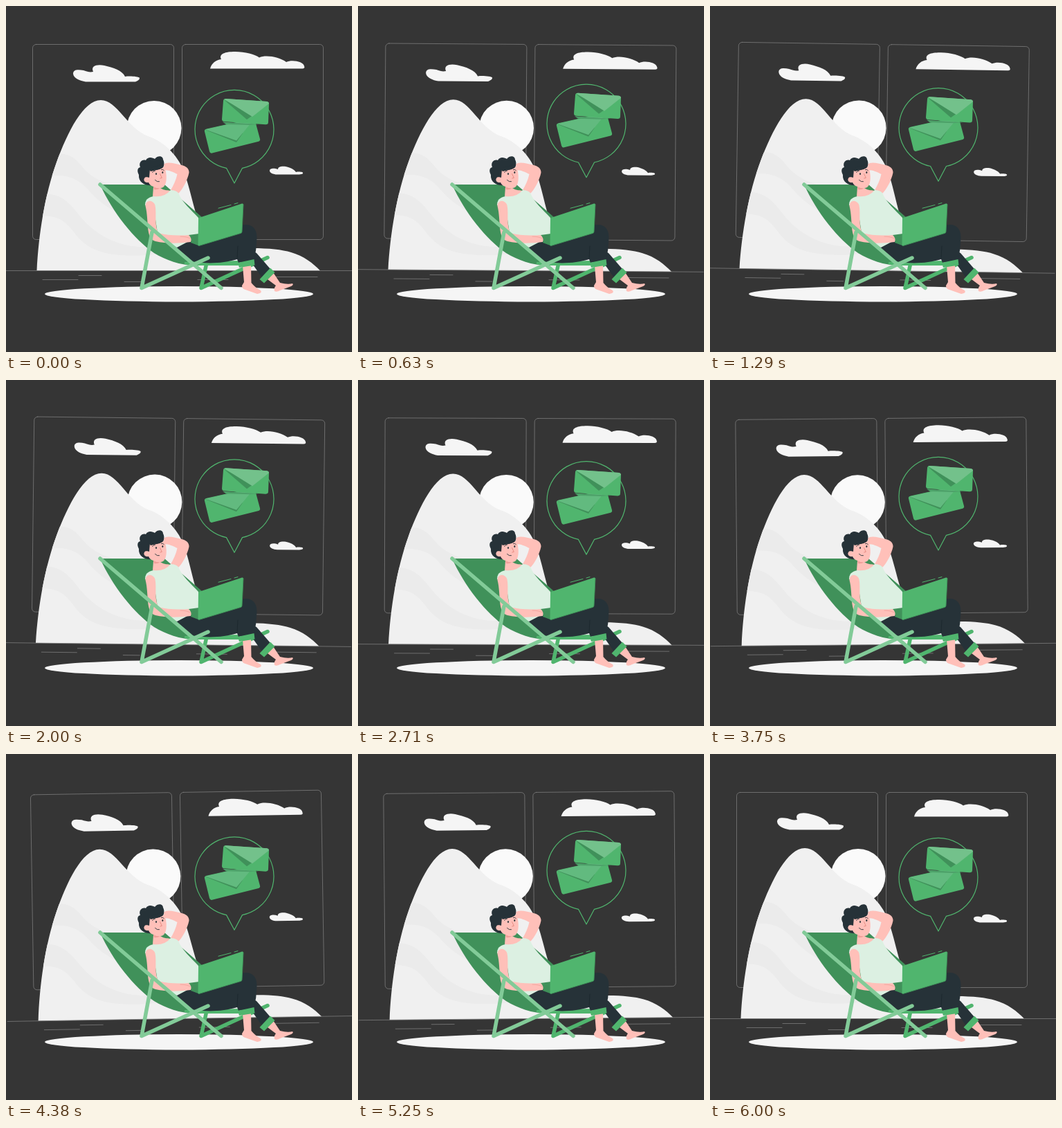
Recreate the animation shown at these times as an HTML page with a canvas. Size 500 by 500 pixels, loop 6.04 s.

```html
<!DOCTYPE html>
<html lang="en">
<head>
<meta charset="utf-8">
<title>Reading mail outdoors</title>
<style>
html, body { margin: 0; width: 100%; height: 100%; overflow: hidden; background: #353535; }
canvas { display: block; width: 500px; height: 500px; }
</style>
</head>
<body>
<canvas id="stage" width="500" height="500"></canvas>
<script>
const ctx = document.getElementById('stage').getContext('2d');
const LOOP = 6040, FPS = 24;
const C = {
  bg: '#353535', snow: '#f0f0f0', band: '#ebebeb', sun: '#fafafa', cloud: '#f5f5f5',
  line: '#7c7c7c', green: '#50b56e', deep: '#40915a', pale: '#82cb98',
  skin: '#ffc0b9', shade: '#f0a09a', shirt: '#dcf0e2', dark: '#263238'
};

function fill(d, color) {
  ctx.fillStyle = color;
  ctx.fill(new Path2D(d));
}

function stroke(d, color, width) {
  ctx.strokeStyle = color;
  ctx.lineWidth = width;
  ctx.stroke(new Path2D(d));
}

function ellipse(x, y, rx, ry, color) {
  ctx.fillStyle = color;
  ctx.beginPath();
  ctx.ellipse(x, y, rx, ry, 0, 0, Math.PI * 2);
  ctx.fill();
}

function pane(x) {
  ctx.strokeStyle = C.line;
  ctx.lineWidth = 0.8;
  ctx.beginPath();
  ctx.roundRect(x, 55.5, 204, 282, 5);
  ctx.stroke();
}

function landscape() {
  pane(38.5);
  pane(254.5);
  ellipse(214, 176.5, 39.5, 39.5, C.sun);

  const hill = 'M44.5 382.5C47 331 56 273 73 226C89 182 112 136 137 136C161 136 174 176 205 188' +
    'C224 194 244 211 254 232C266 258 271 298 284 326C300 348 330 350 356 350' +
    'C380 350 399 352 412 356C430 361 444 372 454 382.5Z';
  fill(hill, C.snow);
  ctx.save();
  ctx.clip(new Path2D(hill));
  fill('M70 215C87 211 98 217 110 232C126 252 146 256 168 264L280 300V330L200 312' +
    'C164 304 137 287 120 267C105 249 88 242 60 246Z', C.band);
  fill('M50 272C76 269 90 282 104 300C123 325 150 342 182 347C206 350 228 348 250 342V352' +
    'C222 360 188 363 156 359C126 355 111 344 99 328C83 307 72 302 44 304Z', C.band);
  ctx.restore();

  fill('M97 98C97 91 105 92 112 93C118 95 121 96 126 95C122 86 132 84 142 86C155 89 168 93 172 102' +
    'C179 101 192 102 193 104C193 107 190 108 187 109.5H115C107 108 98 105 97 98Z', C.cloud);
  fill('M295 90.5C297 83 303 78 311 77C307 69 317 66 331 66C345 66 360 70 366 74.5' +
    'C376 70 395 74 405 81C413 77 430 80 431 87C432 89 431 90.5 428 90.5Z', C.cloud);
  fill('M381 238C381 234 388 234 393 236C393 231 402 231 408 233C414 235 417 237 419 240' +
    'C424 239 430 240 429 241.5C429 243 426 243 424 243.5H392C386 243.5 381 241 381 238Z', C.cloud);

  stroke('M0 382.5H500M53 395.5H104M105 389.5H138M171 398.5H195M277 395.5H321M385 391.5H450', C.line, 0.8);
}

function mail() {
  stroke('M319 234.4A57 57 0 1 1 341 234.4L330 256Z', C.bg, 0.01);
  stroke('M341.5 234.3L330 256L318.5 234.3A57 57 0 1 1 341.5 234.3', C.green, 1.2);

  // lower envelope
  fill('M290 177.5L355 163Q359 162 360 166L367 192Q368 195 364 196L298 212.5Q295 213.5 294 210L287 181.5Q286 178.5 290 177.5Z', C.green);
  fill('M288 179L333 197L342 184Z', C.deep);
  fill('M288 178.5L333 194.5L355 168L357 163Z', '#62ba7f');
  fill('M313 167.5L365 171L352 172L318 171Z', '#4da169');

  // upper envelope
  fill('M318 134L377 138Q380 138.5 380 141.5L379 168Q379 171.5 375 171.3L315 167Q312 166.5 312 163.5L314 137Q314.3 133.7 318 134Z', C.green);
  fill('M315 135.5L348 164L358 157Z', C.deep);
  fill('M315.5 134.7Q316 134 318 134L377 138Q380 138.5 380 141L356 160Z', '#73c18b');
}

function chairBack() {
  stroke('M378 363.5L282 407.5L290 371', C.green, 5.5);
  fill('M136 258H229L283 305L290 372L337 370V375H275C251 375 231 367 214 357C185 337 154 298 136 258Z', C.deep);
  fill('M258 370L337 368V375H275Q266 375 258 373Z', C.green);
}

function head() {
  fill('M228 229C233 224 243 228 252 229.5C260 231 265 235 264.5 241C262 252 256 264 249 271L237 268' +
    'C242 259 246 251 247.5 243C242 240 235 237 229 237Z', C.skin);
  fill('M192 244C189 238 190 234 194 233C191 226 197 221 202 223C205 217 212 219 215 221' +
    'C220 215 227 217 227 222C230 227 228 235 223 237L211 259C201 260 191 255 192 244Z', C.dark);
  fill('M208 236C214 238 222 237 229 232C232 240 233 252 230 258C229 261 226 263 223 263' +
    'C229 267 234 266 238 267C238 275 221 281 212 275L213 261C209 260 207 257 206 255' +
    'C201 256 198 252 200 249C202 246 205 248 207 248Z', C.skin);
  fill('M213 261Q218 264 223 263Q219 266 214 265Z', C.shade);
  fill('M206 235L228 228Q229 233 222 236L209 239Z', C.dark);
  ellipse(217, 242.5, 1, 1.5, C.dark);
  ellipse(226.3, 240.5, 1, 1.5, C.dark);
  stroke('M211.5 240.5Q213 238 215.5 238M224.5 236.5Q227 235.8 228.3 237.5M215.5 251.5Q218.5 254.8 221.5 253.8', C.dark, 0.9);
  stroke('M222.5 242.5L225.3 248.3L222.7 249', '#e08078', 0.8);
}

function body() {
  // far leg
  fill('M374 392L386 385L396 400Q407 403 414 401Q416 403 412 405L396 411Q391 414 388 412Q387 407 390 404Z', C.skin);
  fill('M352 352L362 357L382 380L371 394L357 374Z', C.dark);
  fill('M382 378.5L388.5 385L373 400.5L366.5 395Z', C.green);

  // near leg
  fill('M342 375L354 373L354.5 400Q360 407 368 411Q371 415 363 416L346 410Q341 409 341 404L344 399Z', C.skin);
  fill('M245 349L268 338L340 317C353 313 363 320 362.5 335Q362 352 358.5 368L336 371L334 366' +
    'C312 373 279 373 263 367Z', C.dark);
  stroke('M334 365L335 347', '#19242a', 0.7);
  fill('M335 371L358.5 366L359.5 374.5L337 378Z', C.green);

  // shirt and arm
  fill('M203 280Q207 276 213 275Q229 277 238 266Q245 266 249 270C254 283 267 294 278 306L279 329' +
    'L264 340L247 349L229 340L219 328L213 289L201 288Q201 283 203 280Z', C.shirt);
  fill('M201.5 289C202 279 213 280 215.5 288C218 301 214 315 220 328Q239 333 264 331Q271 335 267 341' +
    'Q238 345 216 340C201 336 207 310 201.5 289Z', C.skin);
  stroke('M252 333Q261 333 266 336', C.shade, 0.8);
}

function laptop() {
  fill('M264 331L279 329V346.5L267 342Q269 335 264 331Z', C.deep);
  fill('M279 306L341 285.5Q343 285 343 287L341 326Q341 328 339 328.5L279 346.5Q277.5 347 277.5 345L278 308Q278 306.5 279 306Z', C.green);
  stroke('M279 346.5L339 328.5Q341 328 341 326L343 287', C.deep, 0.9);
  stroke('M307 292.2L325 287.5M330 286L335 284.6', C.green, 1);
}

function chairFront() {
  stroke('M211 327L196 407.5L292 364M136 258L311 407.5', C.pale, 5.5);
}

function render(sec) {
  ctx.fillStyle = C.bg;
  ctx.fillRect(0, 0, 500, 500);
  ctx.lineCap = ctx.lineJoin = 'round';

  // sway: linear triangle wave, one degree each way over six seconds
  const p = sec / 6 % 1;
  const deg = p < 0.25 ? p * 4 : p < 0.75 ? 2 - p * 4 : p * 4 - 4;
  ctx.save();
  ctx.translate(250, 250);
  ctx.rotate(deg * Math.PI / 180);
  ctx.translate(-250, -250);
  landscape();
  ctx.restore();

  ellipse(250, 416.2, 194, 11.2, C.cloud);

  // float: ten pixels up and back every 1.5 seconds
  const q = sec / 1.5 % 1;
  ctx.save();
  ctx.translate(0, -10 * (1 - Math.abs(2 * q - 1)));
  mail();
  ctx.restore();

  chairBack();
  head();
  body();
  laptop();
  chairFront();
}

const start = performance.now();
function tick() {
  const ms = (performance.now() - start) % LOOP;
  render(Math.floor((ms + 5) * FPS / 1000) / FPS);
  requestAnimationFrame(tick);
}
tick();
</script>
</body>
</html>
```
